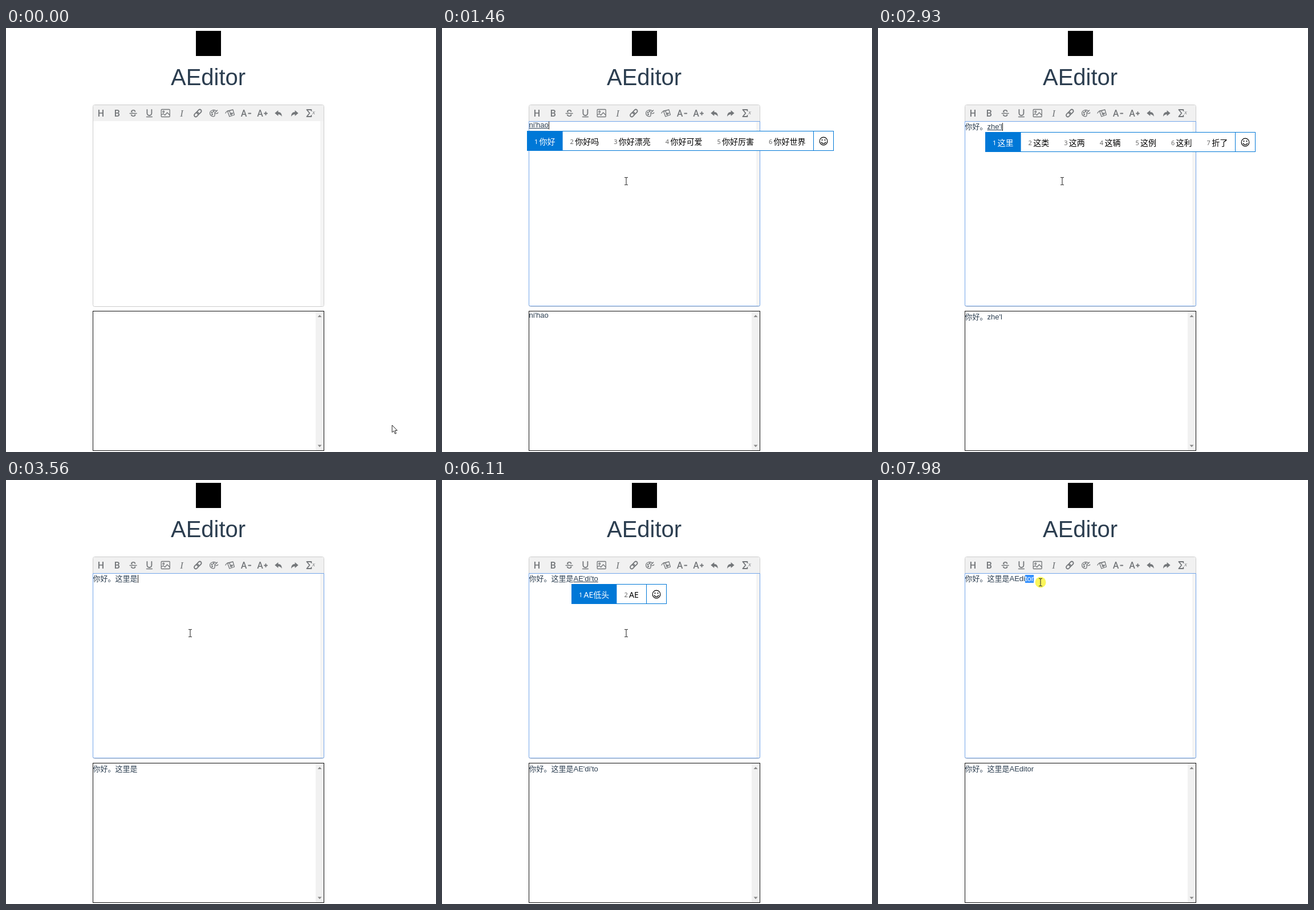
An HTML page that plays this animation: 754x742 px, repeating every 8000 ms.

```html
<!DOCTYPE html>
<html lang="zh-CN">
<head>
<meta charset="utf-8">
<title>AEditor</title>
<style>
  html, body { margin: 0; width: 100%; height: 100%; overflow: hidden; background: #fff; }
  svg { display: block; }
  .title { font: 40px "Liberation Sans", Arial, sans-serif; fill: #2c3e50; text-anchor: middle; }
  .line { font: 13px "Liberation Sans", "Noto Sans CJK SC", "Noto Sans CJK", sans-serif; fill: #2c3e50; }
  .cand { font: 14px "Noto Sans", "Noto Sans CJK SC", "Noto Sans CJK", sans-serif; fill: #000; }
  .num { font: 11px "Noto Sans", sans-serif; fill: #666; }
  .on { fill: #fff; }
  .tool { fill: none; stroke: #74777a; stroke-width: 1.3; stroke-linecap: round; stroke-linejoin: round; }
  .tool text { font: 500 16px Roboto, sans-serif; fill: #74777a; stroke: none; text-anchor: middle; }
  .tool .serif { font: italic 17px "Liberation Serif", serif; }
  .tool .solid { fill: #74777a; stroke: none; }
  .tool .thick { stroke-width: 1.8; }
</style>
</head>
<body>
<svg width="754" height="742" viewBox="0 0 754 742">
  <rect x="333" y="5" width="44" height="44" fill="#000"/>
  <text class="title" x="354.6" y="100">AEditor</text>

  <rect x="152.5" y="134.5" width="405" height="353" rx="3" fill="#fff" stroke="#ccc"/>
  <path d="M153 163V137q0-2 2-2H555q2 0 2 2v26z" fill="#f1f1f1"/>
  <path d="M551 163h6v321q0 3-3 3h-3z" fill="#f4f4f4"/>
  <g class="tool" id="tools"></g>
  <path id="focus" d="M152.5 163.5h405v321q0 2-2 2h-401q-2 0-2-2z" fill="none" stroke="#73a5ea"/>

  <rect x="152.5" y="495.5" width="405" height="244" fill="#fff" stroke="#111"/>
  <rect x="543" y="496" width="14" height="243" fill="#f1f1f1"/>
  <path d="M546.5 506l3.5-4 3.5 4zM546.5 729.5l3.5 4 3.5-4z" fill="#8a8a8a"/>

  <rect id="selection" y="166" height="14" fill="#3390ff"/>
  <text class="line" id="upper" x="152.5"></text>
  <text class="line" id="lower" x="152.5"></text>
  <rect id="underline" height="1" fill="#2c3e50"/>
  <rect id="caret" width="1" height="14" fill="#222"/>
  <g id="popup"></g>

  <circle id="press" r="9.5" fill="#fbf65a"/>
  <path id="arrow" d="M0 0V12.6L2.9 10l2.3 5.2 2-.9L5 9.3H9z" fill="#fff" stroke="#222" stroke-linejoin="round"/>
  <path id="beam" d="M-3-6.5H-1L0-5.8 1-6.5H3M0-5.8V5.8M-3 6.5H-1L0 5.8 1 6.5H3" fill="none" stroke="#333" stroke-width="1.1"/>
</svg>
<script>
const LOOP = 8000, LEFT = 152.5;
const el = id => document.getElementById(id);

// Toolbar icons, each drawn around its own centre
const icons = [
  '<text y="6">H</text>',
  '<text y="6">B</text>',
  '<text y="6">S</text><path d="M-6 .5H6" stroke="#f1f1f1" stroke-width="3.4"/><path d="M-6 .5H6"/>',
  '<path class="thick" d="M-4-6V0a4 4 0 0 0 8 0V-6"/><path d="M-5 6.5H5"/>',
  '<rect x="-7.5" y="-6.5" width="15" height="13" rx="1"/><circle cx="-3.5" cy="-2.5" r="1.3"/><path d="M-7 3l3-2 3 2.5L3-1l4 4"/>',
  '<text class="serif" y="6">I</text>',
  '<g class="thick" transform="rotate(-45)"><rect x="-7.8" y="-2.8" width="9" height="5.6" rx="2.8"/><rect x="-1.2" y="-2.8" width="9" height="5.6" rx="2.8"/></g>',
  '<path d="M4-4C0-7-7-5-7 0s6 7 8 5c1.500-2-1-3 1-4s5 .5 5-2"/><circle cx="-3.500" cy="-1" r=".8"/><circle cx="-.5" cy="-3" r=".8"/><circle cx="-3" cy="2.300" r=".8"/><path d="M6-5L1 0"/>',
  '<path d="M-8 0C-6-4-3-5 0-4M-3-4L5-6 7.500 3-1 6-4-2zM-1-3L1 1 5 0"/><circle cx="2" cy="1.500" r="1.500"/>',
  '<text x="-4" y="6">A</text><path class="thick" d="M4 .5H8"/>',
  '<text x="-4" y="6">A</text><path class="thick" d="M3.500.5H8.500M6-2V3"/>',
  '<path class="solid" d="M-6.500 0L-.5-5V-2C4-2 6 1 6 6 4 3 2 2-.5 2V5z"/>',
  '<path class="solid" d="M6.500 0L.5-5V-2C-4-2-6 1-6 6-4 3-2 2 .5 2V5z"/>',
  '<path class="thick" d="M1-4V-6H-7L-2 0-7 6H1V4"/><text class="serif" x="5" y="2" style="font-size:11px">x</text>'
];
el('tools').innerHTML = icons.map((shape, i) =>
  `<g transform="translate(${166.5 + i * 28.3} 149)">${shape}</g>`).join('');

const hello = '你好。', here = hello + '这里是', full = here + 'AEditor';
const niList = '你 泥 尼 拟 妮 逆 腻';
const haList = '你好 你还 你会 你和 你很 你号 拟好';
const zhList = '这 中 只 之 知 种 着';
const liList = '这里 这类 这两 这辆 这例 这利 折了';
const shList = '这里是 这里说 这里 这类 这两 这利 折力';

// time, committed text, composing text, candidates, caret shown
const steps = [
  [0, '', '', '', 0],
  [380, '', '', '', 1],
  [930, '', '', '', 0],
  [1080, '', 'n', '你 呢 那 您 年 内 能', 1],
  [1160, '', 'ni', niList, 1],
  [1310, '', "ni'h", haList, 1],
  [1380, '', "ni'ha", haList, 1],
  [1460, '', "ni'hao", '你好 你好吗 你好漂亮 你好可爱 你好厉害 你好世界', 1],
  [1620, '你好', '', '', 1],
  [1770, hello, '', '', 1],
  [2320, hello, '', '', 0],
  [2470, hello, 'z', '在 这 中 自 做 只 最', 1],
  [2550, hello, 'zh', '在 这 中 自 做 只 最', 1],
  [2630, hello, 'zh', zhList, 1],
  [2780, hello, 'zhe', '这 着 者 折 哲 浙 遮', 1],
  [2930, hello, "zhe'l", liList, 1],
  [3100, hello, "zhe'li", liList, 1],
  [3180, hello, "zhe'li's", shList, 1],
  [3250, hello, "zhe'li'sh", shList, 1],
  [3330, hello, "zhe'li'shi", '这里是 这里 这力 浙里 这理 这离 折里', 1],
  [3560, here, '', '', 1],
  [4110, here, 'A', 'A', 1],
  [4410, here, 'AE', 'AE', 1],
  [4720, here, "AE'd", 'AE的 AE', 1],
  [4870, here, "AE'di", 'AE地 AE', 1],
  [5040, here, "AE'di't", 'AE低头 AE', 1],
  [5420, here, "AE'di", 'AE地 AE', 1],
  [5570, here, "AE'di't", 'AE低头 AE', 1],
  [5650, here, "AE'di'to", 'AE低头 AE', 1],
  [6110, here, "AE'di'to", 'AE低头 AE', 0],
  [6280, here, "AE'di'to'r", 'AE低头人 AE', 1],
  [6430, full, '', '', 1],
  [6980, full, '', '', 0],
  [7480, full, '', '', 1]
];

// time, x, y, pressed
const mouse = [
  [0, 677, 695, 0], [70, 610, 615, 0], [150, 490, 468, 0], [230, 385, 340, 0],
  [300, 323, 268, 0], [380, 323, 268, 1], [450, 323, 268, 0],
  [7360, 316, 256, 0], [7440, 300, 230, 0], [7520, 280, 200, 0], [7590, 264, 177, 0],
  [7670, 256, 168, 0], [7750, 256, 168, 1], [7900, 269, 173, 1], [7980, 285, 179, 1]
];

// time, first and last selected character
const picks = [[0, 0, 0], [7750, 10, 10], [7900, 10, 12], [7980, 10, 13]];

const at = (table, t) => table.findLast(row => row[0] <= t);
const show = (node, on) => node.style.display = on ? '' : 'none';
const set = (node, attrs) => { for (const k in attrs) node.setAttribute(k, attrs[k]); };
const isHan = c => c > '\u2e80';
const candWidth = s => [...s].reduce((w, c) => w + (isHan(c) ? 14 : 8.4), 0);

function popupMarkup(list, x, y) {
  const words = list.split(' '), lead = words.length > 1 ? 8.6 : 0;
  let out = '', end = x;
  words.forEach((word, i) => {
    const width = 26 + lead + candWidth(word), cls = i ? '' : ' on';
    if (!i) out += `<rect x="${x}" y="${y}" width="${width}" height="35" fill="#0078d7"/>`;
    if (lead) out += `<text class="num${cls}" x="${end + 13}" y="${y + 23}">${i + 1}</text>`;
    out += `<text class="cand${cls}" x="${end + 13 + lead}" y="${y + 23.5}">${word}</text>`;
    end += width;
  });
  const right = Math.round(end + 36) - .5, bar = Math.round(end) + .5;
  const frame = `<rect x="${x + .5}" y="${y + .5}" width="${right - x - .5}" height="34" fill="#fff" stroke="#0078d7"/>`;
  const smile = `<path d="M${bar} ${y}v35" stroke="#0078d7"/>
    <g transform="translate(${bar + 17.5} ${y + 18})" fill="none" stroke="#000" stroke-width="1.2">
      <circle r="6.8"/><path d="M-3.8 1.5a4 4 0 0 0 7.600 0"/>
      <g fill="#000" stroke="none"><circle cx="-2.500" cy="-2" r="1.100"/><circle cx="2.500" cy="-2" r="1.100"/></g></g>`;
  return frame + out + smile;
}

function drawText(t) {
  const [, done, typing, list, blink] = at(steps, t);
  const [, from, to] = at(picks, t);
  const text = done + typing, upper = el('upper');
  const drop = [...text].some(isHan) ? 3 : 0;

  upper.innerHTML = text.slice(0, from) + `<tspan fill="#fff">${text.slice(from, to)}</tspan>` + text.slice(to);
  el('lower').textContent = text;
  set(upper, { y: 174 + drop });
  set(el('lower'), { y: 507 + drop });

  const xOf = n => LEFT + (n ? upper.getSubStringLength(0, n) : 0);
  const start = xOf(done.length), end = xOf(text.length);
  set(el('underline'), { x: start, y: 175 + drop, width: end - start });
  set(el('selection'), { x: xOf(from), width: xOf(to) - xOf(from) });
  set(el('caret'), { x: Math.round(from ? xOf(from) : end), y: drop ? 166 : 163.5 });
  show(el('caret'), blink && from === to);
  show(el('focus'), t >= 380);
  el('popup').innerHTML = list ? popupMarkup(list, Math.round(start - 3.6), drop ? 182 : 180) : '';
}

function drawMouse(t) {
  const [, x, y, pressed] = at(mouse, t);
  const inside = x > 152 && x < 551 && y > 163 && y < 487;
  for (const id of ['arrow', 'beam', 'press']) set(el(id), { transform: `translate(${x} ${y})` });
  show(el('arrow'), !inside);
  show(el('beam'), inside);
  show(el('press'), pressed);
}

function frame() {
  const t = performance.now() % LOOP;
  drawText(t);
  drawMouse(t);
  requestAnimationFrame(frame);
}
frame();
</script>
</body>
</html>
```
